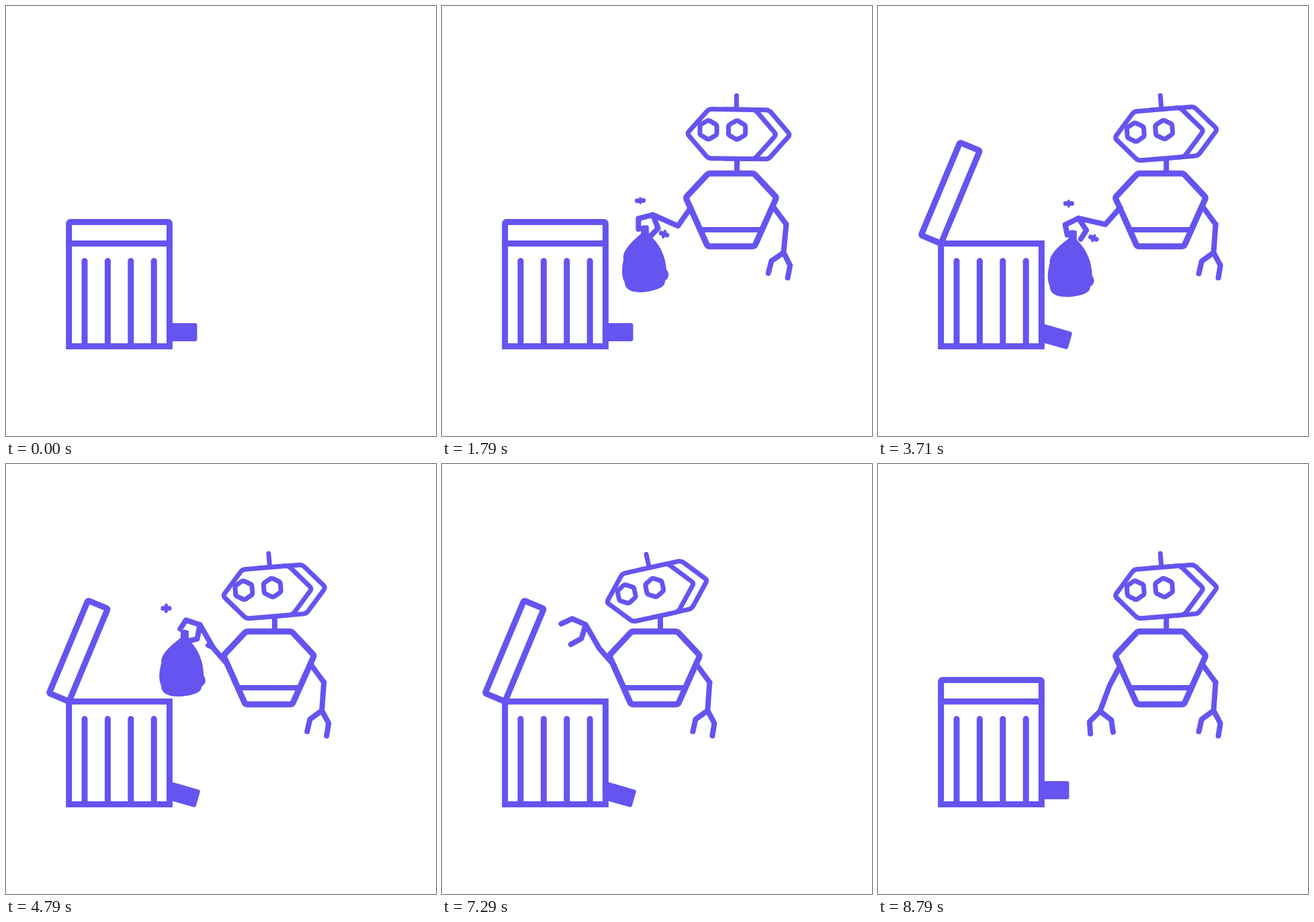
Recreate the animation shown at these times as an HTML page. Size 640 px wide and 640 px high, loop 9.57 s.

```html
<!DOCTYPE html>
<html lang="en">
<head>
<meta charset="utf-8">
<title>Robot and bin</title>
<style>
html, body { margin: 0; width: 100%; height: 100%; overflow: hidden; background: #fff; }
svg { display: block; width: 100vw; height: 100vh; }
.line { fill: none; stroke: #6554f0; stroke-width: 8; stroke-linecap: round; stroke-linejoin: round; }
.solid { fill: #6554f0; }
.white { fill: #fff; }
.butt { stroke-linecap: butt; }
.w9 { stroke-width: 9; }
.w7 { stroke-width: 7; }
</style>
</head>
<body>
<svg viewBox="0 0 640 640">
  <g id="bag">
    <path class="solid" d="M-6 0Q0-3 6 0V13Q28 34 29 66Q36 76 26 83Q27 95-5 98Q-34 99-34 82Q-40 70-34 48Q-37 34-6 11Z"/>
    <g id="flyA" class="line w7"><path d="M-4.6 0H4.6"/><path class="wing" d="M0-4.5V4.5"/></g>
    <g id="flyB" class="line w7"><path d="M-4.6 0H4.6"/><path class="wing" d="M0-4.5V4.5"/></g>
  </g>
  <g id="robot">
    <path id="trail" class="line w7"/>
    <path class="line butt" d="M8.7 226V248"/>
    <path id="body" class="line w9"/>
    <path class="line butt" d="M-46 333H46"/>
    <path id="leftArm" class="line"/>
    <path class="line" d="M63 299L82 325"/>
    <path id="rightArm" class="line"/>
    <g id="head" class="line w7">
      <path d="M7 133.5V152"/>
      <path id="headBack"/>
      <path id="headFront" class="white"/>
      <path id="eyes"/>
    </g>
  </g>
  <rect id="pedal" class="solid" x="239" y="472" width="45.5" height="27" rx="3"/>
  <rect class="line w9 white" style="stroke-linejoin:miter" x="93.7" y="353.5" width="149.7" height="153"/>
  <path id="slats" class="line w9"/>
  <rect id="lid" class="line w9 white" x="93.7" y="321.5" width="149.7" height="32" rx="2"/>
</svg>
<script>
const LOOP = 9570, RELEASE = 6430;
const $ = id => document.getElementById(id);
const path = (id, d) => $(id).setAttribute("d", d);
const transform = (id, value) => $(id).setAttribute("transform", value);

const progress = (t, from, to) => Math.min(1, Math.max(0, (t - from) / (to - from)));
function ease(t, from, to) {
  const s = progress(t, from, to);
  return s * s * (3 - 2 * s);
}

function polar([x, y], degrees, length) {
  const a = degrees * Math.PI / 180;
  return [x + length * Math.cos(a), y + length * Math.sin(a)];
}

const polyline = points => "M" + points.map(p => p.join(" ")).join("L");

// Closed polygon whose corners are cut by a curve of the given reach.
function rounded(points, reach) {
  const toward = ([x, y], [u, v]) => {
    const k = reach / Math.hypot(u - x, v - y);
    return `${x + (u - x) * k} ${y + (v - y) * k}`;
  };
  const n = points.length;
  return points.map((p, i) =>
    `${i ? "L" : "M"}${toward(p, points[(i + n - 1) % n])}Q${p.join(" ")} ${toward(p, points[(i + 1) % n])}`
  ).join("") + "Z";
}

function headShape(x) {
  const y = 190.6, side = 66.5, flat = 34.5, h = 36.6;
  return rounded([[x - flat, y - h], [x + flat, y - h], [x + side, y],
    [x + flat, y + h], [x - flat, y + h], [x - side, y]], 4.5);
}

function eye(x, y) {
  return rounded(Array.from({ length: 6 }, (_, i) => polar([x, y], 30 + 60 * i, 14.5)), 2.5);
}

function claw(wrist, angle, curl, spread = 97) {
  const tip = 18 - 2.5 * curl;
  const outer = polar(wrist, angle, 22);
  const inner = polar(wrist, angle - spread, 21.5);
  return polyline([polar(outer, angle - 49 - 26 * curl, tip), outer, wrist,
    inner, polar(inner, angle - spread + 44 + 22 * curl, tip)]);
}

function drawStill() {
  const half = [[34, 249.3], [67.5, 285], [35, 357.7]];
  const mirrored = half.map(([x, y]) => [-x, y]).reverse();
  path("body", rounded([...half, ...mirrored], 3));
  path("headFront", headShape(0.5));
  path("headBack", headShape(21));
  path("eyes", eye(-34.3, 184.8) + eye(8.2, 184.5));
  path("rightArm", polyline([[82, 325], [79, 367]]) + claw([79, 367], 144, -0.3, 82));
  let slats = "";
  for (let i = 0; i < 4; i++) slats += `M${117 + 34.4 * i} 379.5V506`;
  path("slats", slats);
}

// How far each action of the story has come, from 0 to 1.
const story = t => ({
  enter: 1 - (1 - progress(t, 430, 3060)) ** 5,
  settle: ease(t, 800, 2200),
  dip: ease(t, 3380, 3620),
  lift: ease(t, 3600, 4340),
  lean: ease(t, 4350, 5610),
  sway: ease(t, 5710, 6400),
  letGo: ease(t, RELEASE, 6660),
  leave: ease(t, 7290, 8644),
  pedal: ease(t, 2800, 3250) - ease(t, 7900, 8300),
  lid: ease(t, 2849, 3425) - ease(t, 8150, 8720),
  tilt: -6.4 + 9.8 * ease(t, 430, 2500) - 8.1 * ease(t, 2500, 3700)
    - 7.8 * ease(t, 4790, 6250) + 7.8 * ease(t, 7290, 8644)
});

const robotX = s => 420.5 + 375 * (1 - s.enter) - 104.2 * (s.lean - s.leave);

function arm(s) {
  const shoulder = [-60, 300];
  const elbow = polar(shoulder, 125 + 104 * s.lift - 111 * s.leave, 33.5);
  const wrist = polar(elbow, 204 - 14 * s.dip + 50 * s.lift - 129.5 * s.leave, 41);
  const hand = 165 - 14 * s.dip + 47 * s.lift + 6 * s.letGo - 69 * s.leave;
  return { shoulder, elbow, wrist, hand };
}

function drawFly(id, x, y, angle, flap) {
  transform(id, `translate(${x} ${y}) rotate(${angle})`);
  $(id).querySelector(".wing").style.strokeWidth = 5 * Math.abs(flap);
}

function drawBag(t) {
  const s = story(Math.min(t, RELEASE));
  const { wrist, hand } = arm(s);
  const [x, y] = polar(wrist, hand - 39.5, 20.8 + 3.6 * s.lift);
  const fall = 165 * progress(t, RELEASE, RELEASE + 450) ** 2;
  const swing = -14.5 * (1 - s.settle) + 0.7 * s.lift + 2.3 * s.sway;
  transform("bag", `translate(${x + robotX(s)} ${y + fall}) rotate(${swing})`);
  $("bag").style.display = t < 6900 ? "" : "none";

  const flap = Math.PI * (t - 1210) / 204.5;
  drawFly("flyA", -4.5 - 23.5 * s.lift, -26 - 15.5 * s.settle + 8.5 * s.lift, 0, Math.sin(flap));
  drawFly("flyB", 20 + 10.5 * s.settle + 8.5 * s.lift, 27.6 - 18 * s.settle + 13.5 * s.lift, 22, Math.cos(flap));
}

function draw(t) {
  const s = story(t);
  const { shoulder, elbow, wrist, hand } = arm(s);
  transform("robot", `translate(${robotX(s)} 0)`);
  transform("head", `rotate(${s.tilt} 1.5 222)`);
  transform("rightArm", `rotate(${6.2 * (1 - s.settle)} 82 325)`);
  path("leftArm", polyline([shoulder, elbow, wrist]) + claw(wrist, hand, 1 - s.letGo));
  path("trail", `M72.5 245.5h${48 * (1 - ease(t, 1360, 1750))}`);
  $("trail").style.display = t < 1750 ? "" : "none";
  drawBag(t);
  transform("lid", `rotate(${-67.3 * s.lid} 93.7 353.5)`);
  transform("pedal", `rotate(${16 * s.pedal} 239 496.6)`);
}

drawStill();
const start = performance.now();
function frame() {
  draw((performance.now() - start) % LOOP);
  requestAnimationFrame(frame);
}
frame();
</script>
</body>
</html>
```
